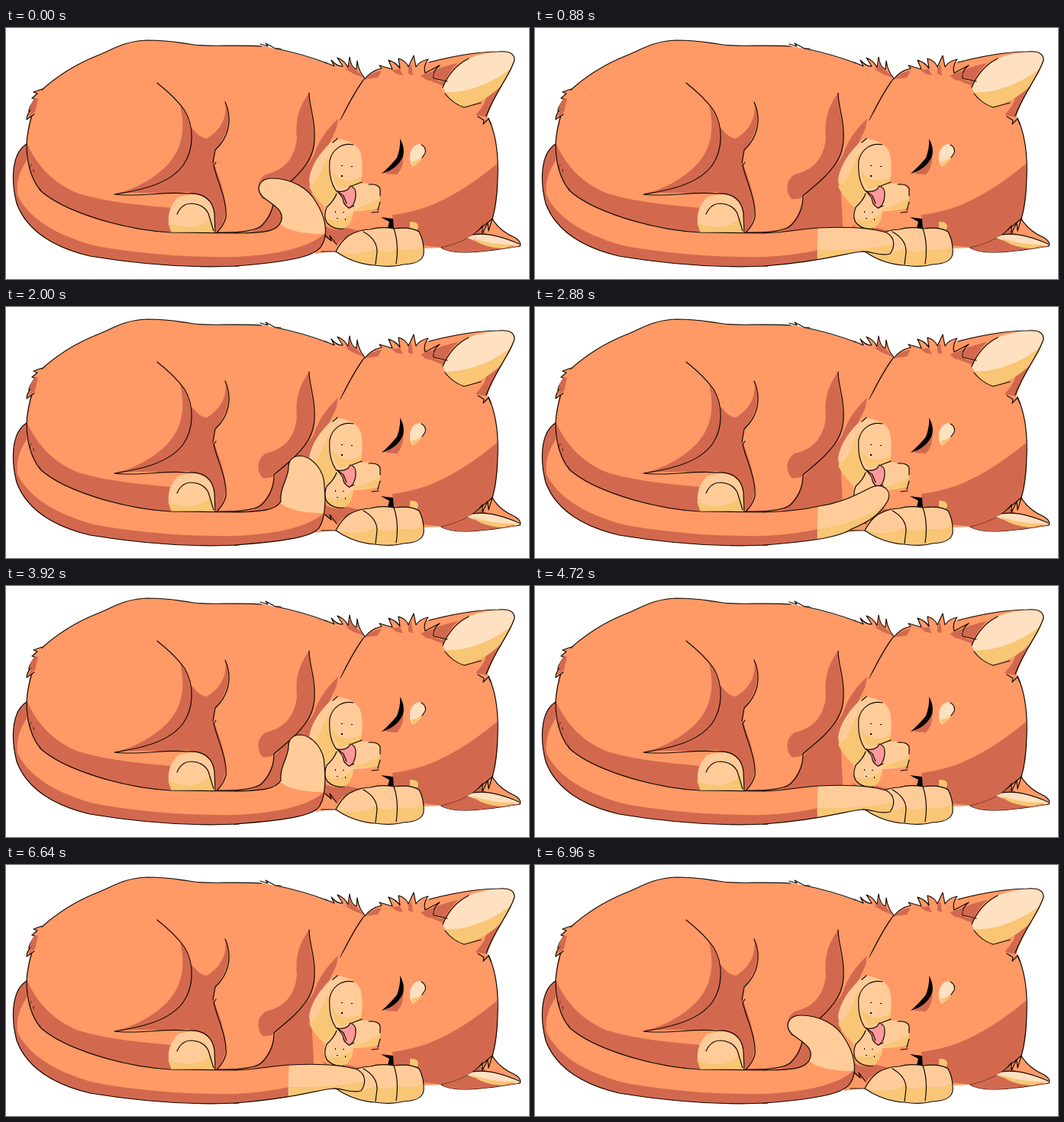
Recreate the animation shown at these times as an HTML page. Size 685x329 px, loop 8 s.

```html
<!DOCTYPE html>
<html lang="en">
<head>
<meta charset="utf-8">
<title>Sleeping cat</title>
<style>
  html, body { margin: 0; height: 100%; overflow: hidden; background: #fff; }
  svg { display: block; width: 100vw; height: 100vh; }
  path { stroke-linejoin: round; stroke-linecap: round; }
  .fur { fill: #ff9966; }
  .shade { fill: #d2694f; }
  .cream { fill: #ffcc99; }
  .gold { fill: #f8c674; }
  .ear { fill: #ffe0c0; }
  .pink { fill: #ff9999; }
  .ink { fill: #000; }
  .line { fill: none; }
  .line, .edge { stroke: #150800; stroke-width: 1.2; }
</style>
</head>
<body>
<svg viewBox="0 0 685 329">
  <defs>
    <path id="tail"/>
    <clipPath id="tailClip"><use href="#tail"/></clipPath>
  </defs>

  <g id="body">
    <path class="fur" d="M27 152C28 125 35 100 47 81C70 60 95 46 120 36C140 28 155 17 185 16C215 16 225 19 240 21C262 26 300 21 338 24C375 31 420 44 470 66L440 270L410 290L300 269H215C150 264 75 240 45 213C31 195 27 175 27 152Z"/>
    <path class="shade" d="M27 150C40 180 62 204 95 217C140 230 180 232 217 236L218 268C150 264 80 242 45 213C30 195 27 175 27 150Z"/>
    <path class="shade" d="M228 101C240 115 246 140 241 162C234 186 212 202 185 209L142 218C170 211 194 197 211 180C232 158 235 130 228 101Z"/>
    <path class="shade" d="M243 130Q254 145 263 145C282 134 290 116 287 98C296 120 290 140 274 160L272 176L282 205C290 236 290 250 276 269L272 250C270 228 258 219 238 215C205 218 170 214 142 218L190 208C226 197 244 172 243 130Z"/>
    <path class="shade" d="M397 85C383 105 379 120 381 145C378 170 366 186 340 192C328 200 328 215 336 224Q344 225 350 222L372 203C398 182 406 164 404 140C402 115 396 103 397 85Z"/>
    <path class="shade" d="M435 119Q412 140 403 167C395 184 368 204 352 222C348 242 338 260 318 269H415L430 240L408 180Q420 160 430 148Z"/>
    <path class="line" d="M27 152C28 133 32 120 36 108M46 82C70 60 95 46 120 36C140 28 155 17 185 16C215 16 225 19 240 21C262 26 300 21 335 24M354 27Q388 34 420 46M470 66Q457 82 438 121"/>
    <path class="fur edge" d="M47 80L36 84L41 86L34 92L38 93Q29 105 30 110L34 106Q27 113 27 120L37 113"/>
    <path class="shade" d="M42 92L36 94Q30 104 31 109L35 106L29 117L38 110Z"/>
    <path class="line" d="M333 21L343 24L340 20L353 27L360 27M33 179L30 190L36 186L35 198L45 212"/>
    <path class="shade" d="M33 178L29 194L45 213L38 195Z"/>
    <path class="line" d="M198 72Q222 91 234 108C247 130 246 160 232 180C214 204 180 212 142 218C175 222 205 214 238 217"/>
    <path class="line" d="M287 97C298 122 290 145 274 160L271 177M275 176L272 180C277 202 290 226 288 248Q285 260 275 269M397 85C397 103 405 120 404 142C405 166 392 184 372 202L351 220Q351 243 335 259Q323 269 276 268"/>
    <path class="cream" d="M225 222C250 213 270 221 273 242L273 268H217C209 250 213 235 225 222Z"/>
    <path class="gold" d="M212 255C232 264 255 263 269 248L273 268H217Z"/>
    <path class="line" d="M238 217C260 215 271 227 273 243L274 268M224 244Q230 230 243 230M243 230Q259 231 265 243L272 266"/>
  </g>

  <g id="tailBase">
    <path class="fur" d="M27 152C6 165 7 203 14 230C27 265 60 287 110 299C170 309 240 315 305 312V269H215C150 264 75 240 45 213C31 195 27 175 27 152Z"/>
    <path class="shade" d="M27 152C6 165 7 203 14 230C27 265 60 287 110 299C170 309 240 315 305 312V300C240 301 170 296 115 285C65 271 30 250 15 219C13 203 18 187 27 174Z"/>
    <path class="line" d="M27 152C6 165 7 203 14 230C27 265 60 287 110 299C170 309 240 315 305 312M27 152C27 175 31 195 45 213C75 240 150 264 215 268L305 269"/>
  </g>

  <g id="head">
    <path class="fur" d="M470 66Q490 54 510 53L555 62L578 68L632 118C642 140 645 170 644 195Q643 230 637 250L610 276L575 288L433 292L405 296L400 200L438 121Z"/>
    <path class="shade" d="M643 178C615 201 585 222 550 235Q525 243 506 245L508 264L545 285L575 288L612 274L637 250C644 230 645 204 643 178ZM416 258Q430 268 447 262L464 266Q440 275 434 284L418 274Z"/>
    <path class="line" d="M632 118C642 140 645 170 644 195Q643 230 637 250M413 293L433 293M418 272L426 279L424 272L433 284"/>

    <path class="fur" d="M548 46C580 37 615 31 645 31Q666 29 666 42C660 62 642 82 630 117L617 117L598 103L572 78L548 66Z"/>
    <path class="shade" d="M650 76C640 88 634 104 630 117L615 114Q628 100 629 91ZM553 60Q570 50 592 46Q577 60 573 76L550 67Z"/>
    <path class="ear" d="M572 78C586 52 600 39 622 35C642 30 666 28 666 42C661 65 640 90 600 104Q580 96 572 78Z"/>
    <path class="gold" d="M575 84C606 86 640 70 663 52C653 76 632 95 600 104Q584 99 575 84Z"/>
    <path class="line" d="M554 45C585 37 615 31 645 31Q666 29 666 42C660 62 642 82 629 115M572 78C580 58 592 47 606 40M575 86Q585 99 600 104L622 98M618 116L626 121L625 126L632 119L635 126"/>

    <path class="fur edge" d="M418 45L430 50L426 42Q434 51 441 50L434 39Q444 43 448 52L450 38Q452 52 459 54L460 43Q462 57 470 66"/>
    <path class="shade" d="M443 53L448 54L450 42Q452 54 459 55L470 66L455 60Z"/>
    <path class="fur edge" d="M470 67Q478 56 492 53L489 49L506 54L501 42Q512 46 516 53L514 40Q524 43 527 51L534 36L537 51Q542 43 553 41Q546 50 549 59L568 49Q558 57 560 66L578 70"/>
    <path class="shade" d="M470 67Q480 57 492 56L487 65ZM505 55L516 54L520 62L511 60ZM527 52L531 48L533 62L527 60ZM549 60L560 56L559 66L572 72L550 68L543 62Z"/>

    <path class="fur edge" d="M637 250Q646 266 667 275Q676 281 673 286C650 289 625 294 600 294Q580 294 570 288Q602 282 620 264Z"/>
    <path class="shade" d="M570 288Q602 281 621 264L636 274L670 287C648 289 625 294 600 294Q580 294 570 288Z"/>
    <path class="ear" d="M612 271Q640 267 672 282L671 286Q630 286 604 275Z"/>
    <path class="gold" d="M610 275Q638 285 671 284L650 289Q622 287 610 275Z"/>
    <path class="line" d="M612 271Q635 267 672 283M620 264L624 259L624 269L631 255L632 266L637 250"/>

    <path class="cream" d="M431 145C444 146 462 151 465 166Q469 185 464 204Q485 202 490 210L490 235Q474 240 455 240Q453 261 438 264Q421 263 416 245L418 235Q398 216 397 198Q401 171 431 145Z"/>
    <path class="gold" d="M431 153C418 168 420 194 431 211L436 218L418 235Q400 217 397 207C413 202 417 170 431 153ZM418 249Q440 258 455 240Q452 262 438 264Q423 262 418 249ZM427 187C436 202 453 204 466 194L464 204L438 211Q428 203 427 187ZM454 237Q474 232 490 223L490 235Q474 241 454 237Z"/>
    <path class="line" d="M428 150L434 145M455 153C439 150 427 160 424 174Q422 198 432 213L437 216M453 207L466 202M475 205Q488 204 490 211L490 220M490 228L487 239M479 242L488 241M433 217Q430 226 420 235Q415 248 421 256Q430 265 443 263M443 230L449 236L456 233"/>
    <path class="pink edge" d="M434 214Q447 216 451 207Q459 209 458 220Q457 232 450 236Q442 233 441 223Z"/>
    <path class="line" d="M434 214L442 220L446 230"/>
    <path class="ink" d="M439 180h2v1h-2zM439 193h2v2h-2zM452 181h2v1h-2zM431 240h1v2h-1zM441 241h2v1h-2zM433 249h2v1h-2zM444 250h1v2h-1z"/>

    <path class="shade" d="M520 164Q522 182 512 192L497 191Z"/>
    <path class="ink" d="M516 145Q523 157 520 168Q513 185 492 191Q505 179 512 170Q517 157 516 145ZM491 248L507 250L508 263L500 262L502 254Z"/>
    <path class="ear" d="M529 165Q533 152 543 152Q551 156 550 163Q543 175 533 182Q528 177 529 165Z"/>
    <path class="gold" d="M531 175Q540 175 549 165Q543 176 533 182Z"/>
    <path class="line" d="M544 153Q551 157 549 164L545 170"/>
    <path class="gold" d="M529 254Q540 253 540 261L537 267L529 264Z"/>
  </g>

  <g id="paw">
    <path class="cream edge" d="M432 293Q439 279 449 272Q463 264 477 264Q492 260 508 263Q530 260 541 267Q548 280 547 296Q545 309 520 310Q505 314 483 311Q455 309 432 293Z"/>
    <path class="gold" d="M435 293Q460 301 484 289Q496 297 511 290Q533 294 546 286Q549 309 520 309Q505 313 483 310Q455 308 435 293Z"/>
    <path class="line" d="M468 267Q486 277 486 293L484 310M508 263Q515 283 511 309"/>
  </g>

  <g clip-path="url(#tailClip)">
    <use href="#tail" class="fur"/>
    <path id="tailShade" class="shade"/>
    <path id="tailTip" class="cream"/>
    <path id="tipShade" class="gold"/>
  </g>
  <use href="#tail" class="line"/>
</svg>
<script>
const part = id => document.getElementById(id);
const root = "M300 269C330 268 ", end = " 380 306 300 312";
const upShade = "M300 300C360 297 400 287 420 267V325H300Z";
const flatShade = "M300 300Q340 298 371 291V325H300Z";
const upTip = "M361 258Q376 271 425 270H500V180H325V240Z";
const flatTip = "M372 255Q368 275 371 330H500V180Z";

// Poses from curled up to hanging down: outline, body shade, tip, tip shade.
const poses = [
  ["357 270 361 251C363 238 350 232 337 222C325 210 333 197 348 197C374 197 396 210 406 228C420 250 422 272 413 286C405 298", upShade, upTip, ""],
  ["352 268 360 255C358 237 370 225 370 210C370 199 378 195 386 195C403 197 417 215 417 235C419 257 418 276 411 288C405 299", upShade, upTip, ""],
  ["354 267 367 255C380 240 392 230 405 215C416 203 434 205 438 219C440 240 429 265 418 281C408 298", upShade, upTip, ""],
  ["350 266 372 261C400 257 420 247 439 237C455 229 468 240 462 254C450 276 430 284 415 291C402 299", flatShade, flatTip, "M371 291Q425 284 464 254V310H371Z"],
  ["350 263 372 262C410 260 440 262 460 268C473 275 471 288 465 296C452 300 440 292 428 293C410 294", flatShade, flatTip, "M371 291Q430 292 471 283V310H371Z"],
  ["350 263 372 262C405 260 440 272 459 295C471 312 460 325 446 325C429 322 420 306 406 302C398 301", flatShade, flatTip, "M371 291Q420 291 465 318V328H371Z"]
];

const STEP = 80, CYCLE = 1920, RISE = 800, REST = 6960, LOOP = 8000;

function poseAt(t) {
  if (t < STEP || t >= REST) return 0;
  const u = (t - STEP) % CYCLE;
  return u < RISE
    ? Math.min(5, 1 + Math.floor(u / STEP))
    : Math.max(0, 4 - Math.floor((u - RISE) / STEP));
}

function draw() {
  const [outline, shade, tip, tipShade] = poses[poseAt(performance.now() % LOOP)];
  part("tail").setAttribute("d", root + outline + end);
  part("tailShade").setAttribute("d", shade);
  part("tailTip").setAttribute("d", tip);
  part("tipShade").setAttribute("d", tipShade);
  requestAnimationFrame(draw);
}
draw();
</script>
</body>
</html>
```
